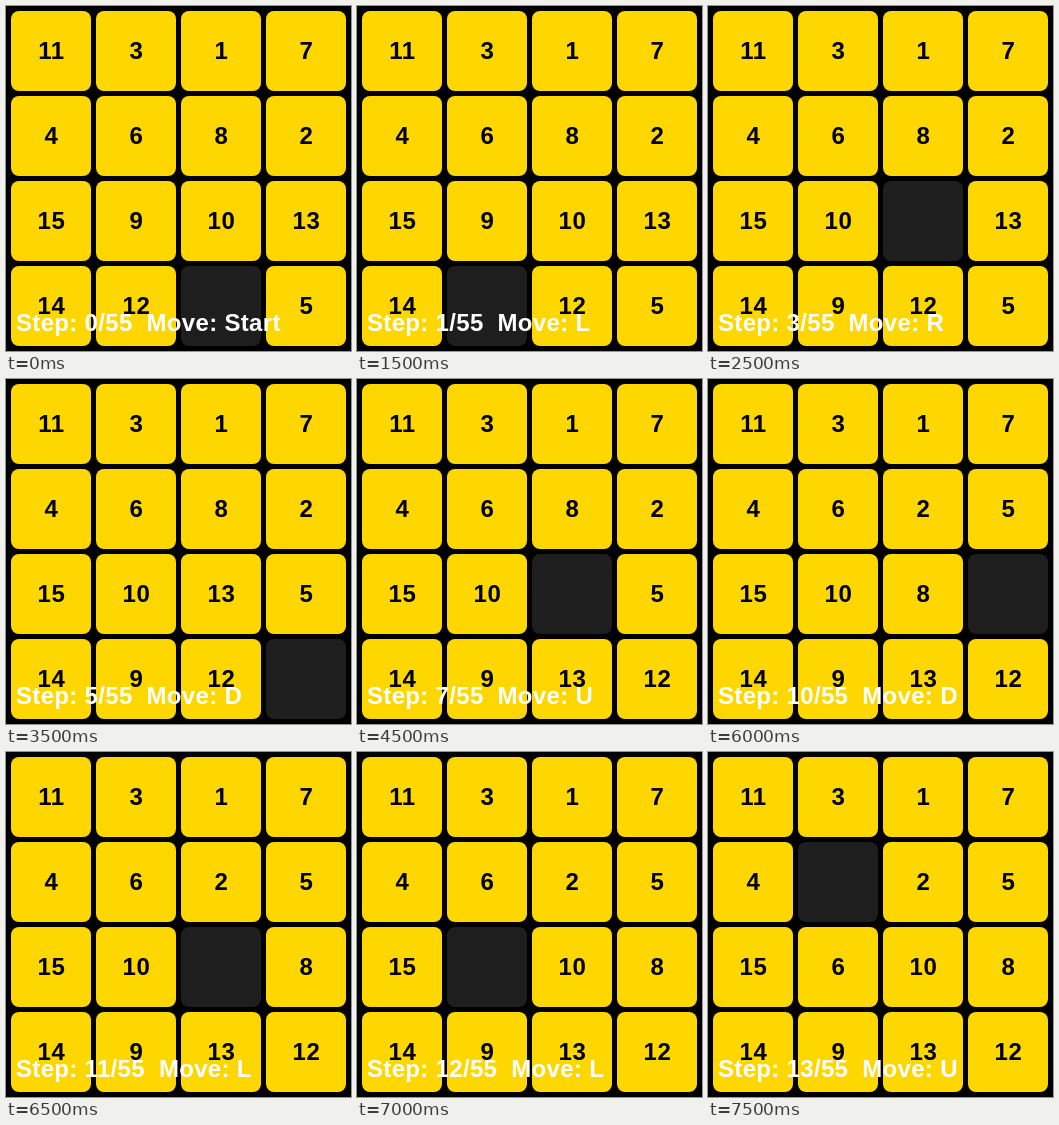
An HTML page with a canvas that plays this animation: 345x345 px, repeating every 8000 ms.

```html
<!DOCTYPE html>
<html lang="en">
<head>
<meta charset="utf-8">
<title>Fifteen puzzle</title>
<style>
  html, body { margin: 0; height: 100%; overflow: hidden; background: #000; }
  canvas { display: block; }
</style>
</head>
<body>
<canvas id="stage" width="345" height="345"></canvas>
<script>
const ctx = document.getElementById('stage').getContext('2d');
const LOOP = 8000, FIRST = 1500, STEP = 500, TOTAL = 55;
const START = [11, 3, 1, 7, 4, 6, 8, 2, 15, 9, 10, 13, 14, 12, 0, 5];
const MOVES = 'LURRDLUURDLLU';
const SHIFT = { L: -1, R: 1, U: -4, D: 4 };

// Each move slides the blank (0) one cell.
function boardAfter(steps) {
  const board = [...START];
  let blank = board.indexOf(0);
  for (const move of MOVES.slice(0, steps)) {
    const next = blank + SHIFT[move];
    board[blank] = board[next];
    board[next] = 0;
    blank = next;
  }
  return board;
}

function write(text, x, y, color, align, spacing) {
  ctx.fillStyle = color;
  ctx.textAlign = align;
  ctx.letterSpacing = spacing;
  ctx.fillText(text, x, y);
}

function draw(steps) {
  ctx.fillStyle = '#000';
  ctx.fillRect(0, 0, 345, 345);
  ctx.font = 'bold 24px "Liberation Sans", Arial, sans-serif';
  boardAfter(steps).forEach((n, i) => {
    const x = 5 + i % 4 * 85, y = 5 + Math.floor(i / 4) * 85;
    ctx.fillStyle = n ? '#ffd700' : '#1e1e1e';
    ctx.beginPath();
    ctx.roundRect(x, y, 80, 80, 8);
    ctx.fill();
    if (n) write(n, x + 40.5, y + 48, '#000', 'center', '0.6px');
  });
  const move = steps ? MOVES[steps - 1] : 'Start';
  write(`Step: ${steps}/${TOTAL}  Move: ${move}`, 10, 325, '#fff', 'left', '0.32px');
}

function frame() {
  const t = performance.now() % LOOP;
  draw(t < FIRST ? 0 : Math.floor((t - FIRST) / STEP) + 1);
  requestAnimationFrame(frame);
}
frame();
</script>
</body>
</html>
```
